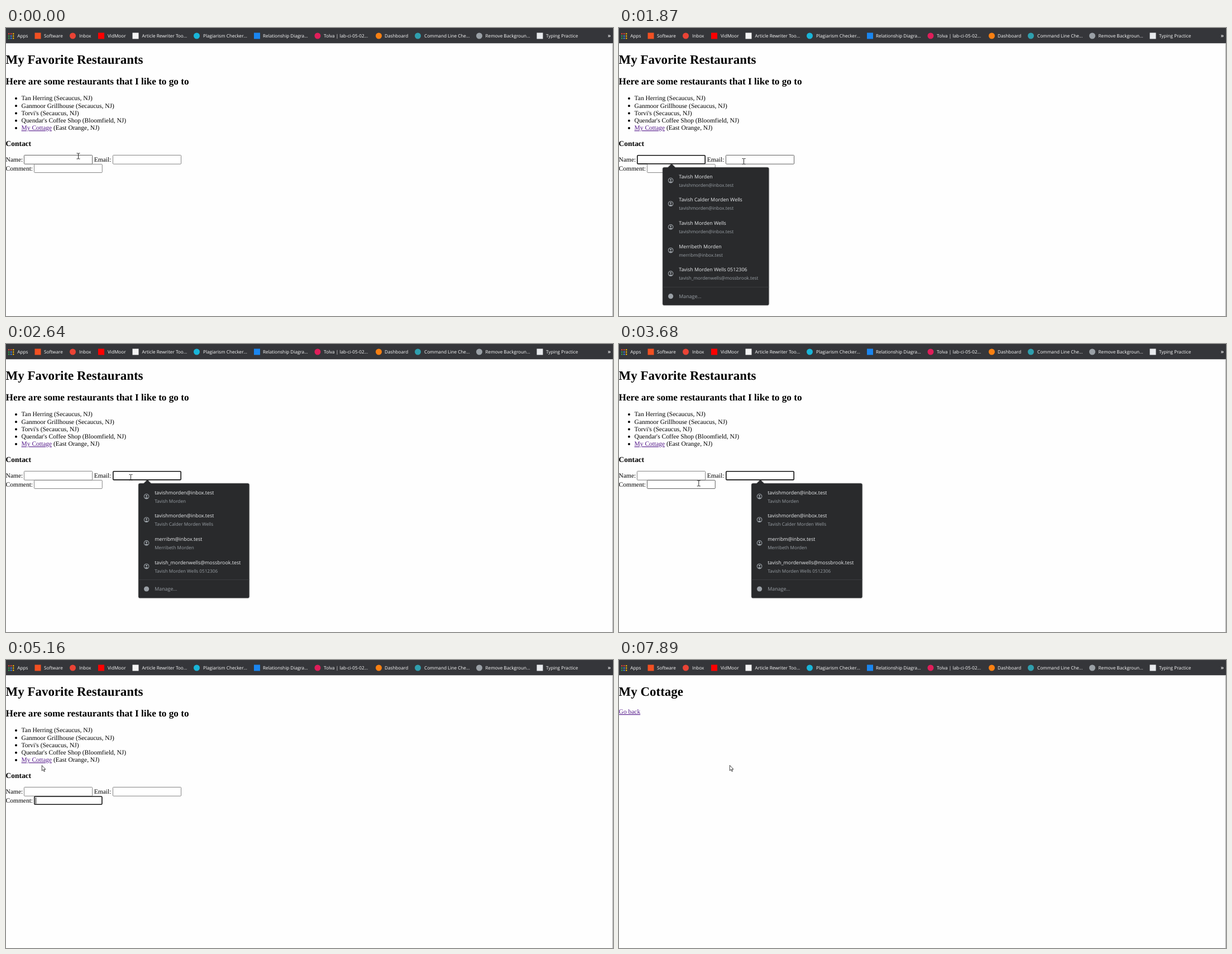
Recreate the animation shown at these times as an HTML page. Size 1087x515 px, loop 8000 ms.

```html
<!DOCTYPE html>
<html lang="en">
<head>
<meta charset="utf-8">
<title>Favorite restaurants</title>
<style>
  html, body { margin: 0; width: 100%; height: 100%; overflow: hidden; background: #fefefe; }
  svg { display: block; width: 100vw; height: 100vh; text-rendering: geometricPrecision; }
  .page { font: 11.48px "Liberation Serif", "Times New Roman", serif; fill: #000; }
  .h1 { font-size: 22.95px; font-weight: bold; }
  .h2 { font-size: 17.19px; font-weight: bold; }
  .h3 { font-size: 13.4px; font-weight: bold; }
  .link { fill: #551a8b; text-decoration: underline; }
  .bar { font: 8.2px "Open Sans", "Noto Sans", sans-serif; fill: #fafafa; }
  .popup { font: 8.2px "Open Sans", "Noto Sans", sans-serif; fill: #9aa0a6; filter: drop-shadow(0 .7px 1px #0006); }
  .popup .main { font-size: 8.89px; fill: #eceef0; }
</style>
</head>
<body>
<svg id="stage" viewBox="0 0 1087 515" xmlns="http://www.w3.org/2000/svg"></svg>
<script>
const LOOP = 8000;
const LEFT = -0.4;
const PANEL = '#292a2c';
const stage = document.getElementById('stage');

const text = (x, y, content, cls = '') => `<text x="${x}" y="${y}" class="${cls}">${content}</text>`;
const rect = (x, y, w, h, fill, rx = 0) =>
  `<rect x="${x}" y="${y}" width="${w}" height="${h}" fill="${fill}" rx="${rx}"/>`;
const circle = (x, y, r, fill) => `<circle cx="${x}" cy="${y}" r="${r}" fill="${fill}"/>`;

// Bookmark: icon centre, label start, label, icon shape, icon colour
const bookmarks = [
  [57, 68, 'Software', 'square', '#f25022'],
  [119.5, 131, 'Inbox', 'circle', '#ea4335'],
  [170.5, 182, 'VidMoor', 'square', '#f00'],
  [232, 243.5, 'Article Rewriter Too...', 'square', '#f4f4f4'],
  [341.5, 353, 'Plagiarism Checker...', 'circle', '#19b5d8'],
  [449.5, 460, 'Relationship Diagra...', 'square', '#1a86f0'],
  [558, 569, 'Tolva | lab-ci-05-02...', 'circle', '#e01e5a'],
  [667.5, 678, 'Dashboard', 'circle', '#f98012'],
  [737.5, 749, 'Command Line Che...', 'circle', '#2f9fae'],
  [847.5, 858.5, 'Remove Backgroun...', 'circle', '#9aa0a6'],
  [956, 967, 'Typing Practice', 'square', '#e8eaed'],
];

function bookmarkBar() {
  const colors = ['#ea4335', '#ea4335', '#fbbc04', '#34a853', '#4285f4', '#fbbc04', '#34a853', '#4285f4', '#fbbc04'];
  const apps = colors.map((c, i) => rect(4 + i % 3 * 4, 9.2 + Math.floor(i / 3) * 4, 2.4, 2.4, c, .5)).join('');
  const items = bookmarks.map(([cx, x, label, shape, color]) =>
    (shape === 'circle' ? circle(cx, 14, 5.5, color) : rect(cx - 5.5, 8.5, 11, 11, color)) +
    text(x, 17.1, label)).join('');
  return `<g class="bar">${rect(0, 0, 1087, 27.3, '#35363a')}${apps}${text(20.3, 17.1, 'Apps')}${items}
    <text x="1077.5" y="17" font-size="10" font-weight="600">»</text></g>${rect(1086, 27.3, 1, 488, '#a5a5a5')}`;
}

const restaurants = [
  'Tan Herring (Secaucus, NJ)',
  'Ganmoor Grillhouse (Secaucus, NJ)',
  "Torvi's (Secaucus, NJ)",
  "Quendar's Coffee Shop (Bloomfield, NJ)",
  '<tspan id="link" class="link">My Cottage</tspan> (East Orange, NJ)',
];

// Outer boxes of the inputs
const fields = {
  name: { x: 32, y: 227, w: 123, h: 16.7, caret: [35, 230] },
  email: { x: 191, y: 227, w: 123, h: 16.7, caret: [194, 230] },
  comment: { x: 50, y: 243.2, w: 122.7, h: 15.8, caret: [53, 246] },
};

function homePage() {
  const items = restaurants.map((item, i) => {
    const y = 129.3 + i * 13.23;
    return circle(18, y - 3.2, 2, '#000') + text(27.6, y, item);
  }).join('');
  const inputs = Object.keys(fields).map(id => `<rect id="${id}" fill="#fff"/>`).join('');
  return `<g id="home" class="page">
    ${text(LEFT, 64.3, 'My Favorite Restaurants', 'h1')}
    ${text(LEFT, 101, 'Here are some restaurants that I like to go to', 'h2')}
    ${items}
    ${text(LEFT, 210.6, 'Contact', 'h3')}
    ${text(LEFT, 238.5, 'Name:')}${text(157.8, 238.5, 'Email:')}${text(LEFT, 254.6, 'Comment:')}
    ${inputs}<rect id="caret" width="1" height="11"/></g>`;
}

const cottagePage = () => `<g id="cottage" class="page">
  ${text(LEFT, 64.3, 'My Cottage', 'h1')}${text(LEFT, 96, 'Go back', 'link')}</g>`;

const person = (x, y) => `<g transform="translate(${x} ${y})">
  <circle r="4.3" fill="none" stroke="#9aa0a6" stroke-width="1.1"/>
  <circle cy="-1.2" r="1.5"/><path d="M-2.9 2.8Q0 .1 2.9 2.8Q0 5 -2.9 2.8Z"/></g>`;

function popup(id, x, width, rows) {
  const top = 249.2, step = 41.65;
  const divider = top + 5.4 + rows.length * step;
  const height = divider + 33 - top;
  const tip = x + 16;
  const lines = rows.map(([main, sub], i) => {
    const y = 272.6 + i * step;
    return person(x + 14.4, y) + text(x + 29, y - 4, main, 'main') + text(x + 29, y + 11, sub);
  }).join('');
  return `<g id="${id}" class="popup" style="transform-origin:${x + width / 2}px ${top + height / 2}px">
    <path d="M${tip - 7.5} ${top + 1}L${tip - 1} 243.8Q${tip} 243 ${tip + 1} 243.8L${tip + 7.5} ${top + 1}Z" fill="${PANEL}"/>
    ${rect(x, top, width, height, PANEL, 2.8)}${lines}
    ${rect(x, divider, width, .8, '#3f4144')}
    ${circle(x + 14.4, divider + 16.8, 4.6, '#9aa0a6')}
    <text x="${x + 29}" y="${divider + 20}" font-size="8.89">Manage...</text></g>`;
}

const contacts = [
  ['Tavish Morden', 'tavishmorden@inbox.test'],
  ['Tavish Calder Morden Wells', 'tavishmorden@inbox.test'],
  ['Tavish Morden Wells', 'tavishmorden@inbox.test'],
  ['Merribeth Morden', 'merribm@inbox.test'],
  ['Tavish Morden Wells 0512306', 'tavish_mordenwells@mossbrook.test'],
];
const byEmail = contacts.filter((_, i) => i !== 2).map(([name, mail]) => [mail, name]);

const pointers = `
  <g id="beam" fill="none"><path d="M-3 -5H-1Q0 -5 0 -4Q0 -5 1 -5H3M0 -4V4M-3 5H-1Q0 5 0 4Q0 5 1 5H3" stroke="#222" stroke-width="1"/></g>
  <path id="arrow" d="M0 0V9.6L2.2 7.5L3.8 11L5.2 10.4L3.7 7H6.6Z" fill="#fff" stroke="#111" stroke-width=".8"/>
  <path id="hand" d="M-1.2 .9Q0 -.6 1.2 .9V4.6L4.6 5.5Q6 6 5.8 8.2L4.8 11.3V13.4H-1.8V11.8L-4.4 8.2Q-4.6 6.6 -3.2 7L-1.2 8.6Z"
    fill="#fff" stroke="#111" stroke-width=".9" stroke-linejoin="round"/>`;

stage.innerHTML = rect(0, 0, 1087, 515, '#fefefe') + homePage() + cottagePage() + bookmarkBar() +
  popup('namePopup', 78.2, 190.2, contacts) + popup('emailPopup', 237.2, 198.4, byEmail) + pointers;

// Pointer steps: time, x, y, shape (kept until changed)
const pointerSteps = [
  [0, 129.5, 229, 'beam'], [1090, 130.5, 228.5],
  [1240, 139, 229], [1360, 162, 231], [1480, 190, 234], [1600, 214, 237], [1720, 223.5, 238.5],
  [3170, 213, 240], [3290, 185, 246], [3410, 160, 250], [3530, 146, 251], [3680, 142.8, 249],
  [4800, 138, 245], [4920, 117, 234], [5040, 86, 208, 'arrow'], [5160, 64.3, 188.5],
  [5280, 67, 168, 'beam'], [5400, 70, 173, 'hand'], [5520, 70.8, 174.5], [5640, 70.8, 179.4],
  [6810, 294, 51, 'arrow'], [6960, 417, 169], [7110, 199, 186], [7230, 369, 120], [7380, 325, 240],
  [7530, 191, 150], [7650, 310, 97], [7770, 403, 160], [7890, 198.3, 188.3],
];
const focusSteps = [[0, null], [280, 'name'], [2150, 'email'], [4050, 'comment'], [6010, null]];
const caretSpans = [[280, 840], [1360, 1870], [2150, 2640], [3170, 3680], [4050, 4540], [5040, 5520]];
const popupTimes = { namePopup: [280, 2150], emailPopup: [2150, 4050] };
const FADE = 120, PRESS = 6010, NAVIGATE = 6160;

const el = id => document.getElementById(id);
const show = (id, on) => { el(id).style.display = on ? '' : 'none'; };
const within = (t, [from, to]) => t >= from && t < to;
const setAttributes = (id, values) =>
  Object.entries(values).forEach(([key, value]) => el(id).setAttribute(key, value));

function pointerAt(t) {
  let shape, place;
  for (const [time, x, y, kind] of pointerSteps) {
    if (time > t) break;
    shape = kind || shape;
    place = { x, y, shape };
  }
  return place;
}

function drawField(id, focused, hover) {
  const { x, y, w, h } = fields[id];
  const line = focused ? 1.6 : .9;
  setAttributes(id, {
    x: x + line / 2, y: y + line / 2, width: w - line, height: h - line,
    rx: focused ? 1.5 : 1,
    stroke: focused ? '#101010' : hover ? '#4f4f4f' : '#767676',
    'stroke-width': line,
  });
}

function render(t) {
  const pointer = pointerAt(t);
  const focus = focusSteps.filter(([time]) => time <= t).pop()[1];

  show('home', t < NAVIGATE);
  show('cottage', t >= NAVIGATE);
  el('link').style.fill = t >= PRESS ? '#f00' : '';

  for (const [id, f] of Object.entries(fields)) {
    const hover = within(pointer.x, [f.x, f.x + f.w]) && within(pointer.y, [f.y, f.y + f.h]);
    drawField(id, id === focus, hover);
  }

  const caretOn = focus && caretSpans.some(span => within(t, span));
  show('caret', caretOn);
  if (caretOn) {
    const [x, y] = fields[focus].caret;
    setAttributes('caret', { x, y });
  }

  for (const [id, [open, close]] of Object.entries(popupTimes)) {
    const fading = t >= close;
    show(id, within(t, [open, close + FADE]));
    el(id).style.opacity = fading ? .76 : 1;
    el(id).style.transform = fading ? 'scale(.989)' : '';
  }

  for (const shape of ['beam', 'arrow', 'hand']) {
    show(shape, shape === pointer.shape);
    el(shape).setAttribute('transform', `translate(${pointer.x} ${pointer.y})`);
  }
}

let start;
function tick(now) {
  start ??= now;
  render((now - start) % LOOP);
  requestAnimationFrame(tick);
}
render(0);
requestAnimationFrame(tick);
</script>
</body>
</html>
```
